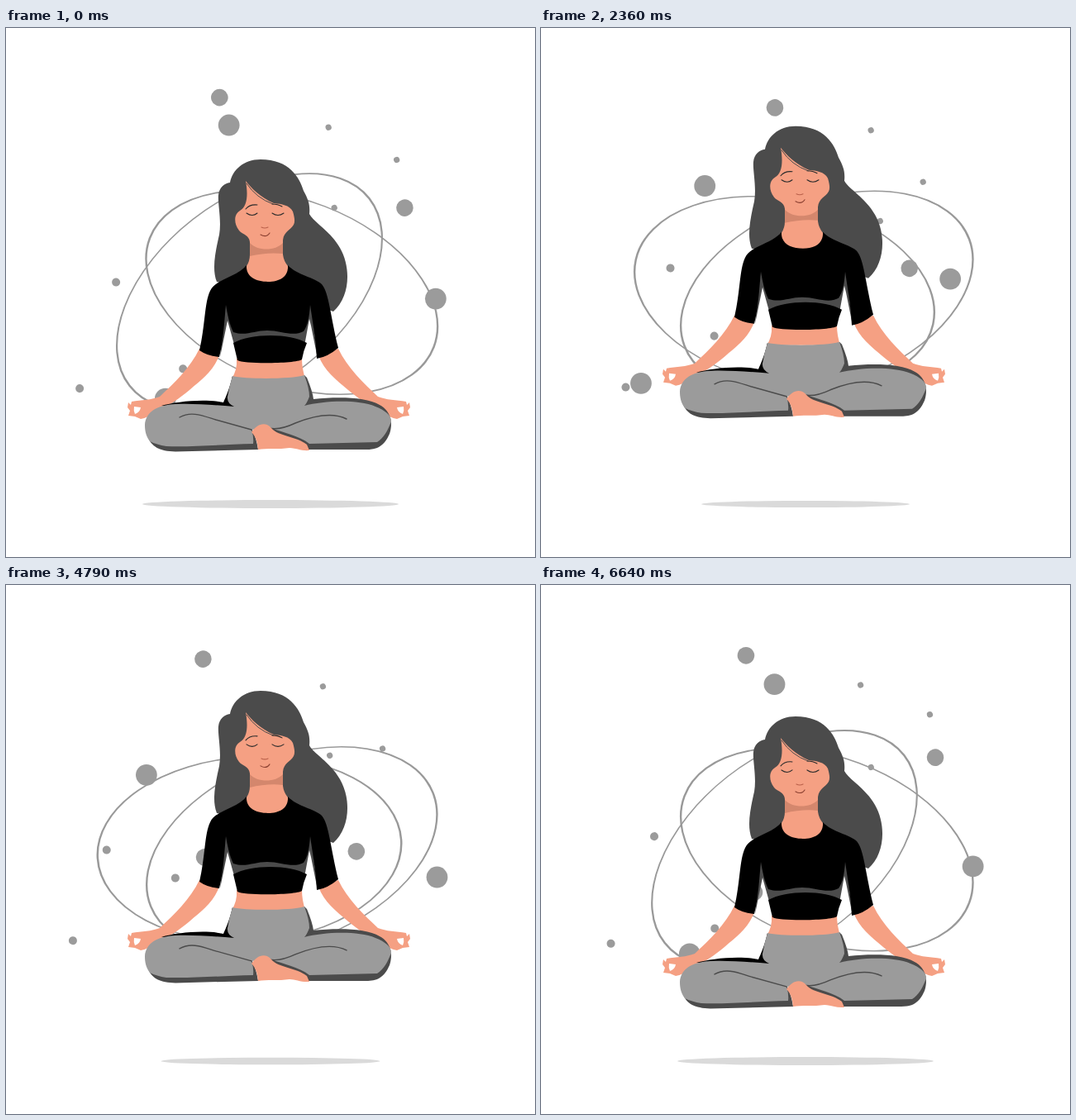
These frames come from a looping animation (640x640 px, 6.71 s). An HTML page:

```html
<!DOCTYPE html>
<html lang="en">
<head>
<meta charset="utf-8">
<title>Floating meditation</title>
<style>
  html, body { margin: 0; width: 100%; height: 100%; overflow: hidden; background: #fff; }
  svg { display: block; width: 100%; height: 100%; }
  .dark { fill: #4b4b4b; }
  .skin { fill: #f5a083; }
  .shade { fill: #d4876d; }
  .grey { fill: #9b9b9b; }
  .line { fill: none; stroke: #4b4b4b; stroke-width: 1.4; stroke-linecap: round; }
  .face { fill: none; stroke: #2b2b2b; stroke-width: 1.1; stroke-linecap: round; }
  .soft { stroke: #b9604a; }
  .ring { fill: none; stroke: #999; stroke-width: 1.5; }
</style>
</head>
<body>
<svg viewBox="0 0 640 640">
  <defs>
    <g id="dots" class="grey">
      <circle r="12.9"/><circle r="12.9"/><circle r="12.9"/>
    </g>
    <g id="arm">
      <path class="skin" d="M234 388 C223 411 203 430 186 446 C176 450 164 450 152 452 L151 456 L148 453 L147 459 L150 463 L148 469 L156 470 L163 473 C169 472 174 469 180 465 C196 458 211 447 222 438 C237 425 251 415 258 396Z"/>
      <path fill="#fff" d="M155 458 L163 459 Q162 465 156 467 Q154 463 155 458Z"/>
    </g>
  </defs>

  <ellipse id="shadow" rx="155" ry="5" fill="#dadada"/>
  <circle id="ringA" class="ring" r="111.5"/>
  <circle id="ringB" class="ring" r="111.5"/>

  <!-- one orbit, shown four times: turned, mirrored and scaled -->
  <use href="#dots"/>
  <use href="#dots" transform="matrix(-.2463 .302 -.302 -.2463 316.1 359.8)"/>
  <use href="#dots" transform="matrix(-.2623 -.7542 -.7542 .2623 641.8 390.2)"/>
  <use href="#dots" transform="matrix(-.1157 -.2548 -.2548 .1157 533.8 214.7)"/>

  <g id="body">
    <path class="dark" d="M308 159 C343 159 355 181 360 197 C366 208 368 214 367 225 C372 235 392 245 404 266 C418 290 416 326 396 343 L360 330 L255 307 C249 292 253 272 258 250 C261 232 256 213 257 202 C258 193 264 188 271 187 C274 172 287 159 308 159Z"/>

    <!-- head and neck -->
    <path class="skin" d="M290 185 C297 194 308 205 324 212 C333 213 343 214 347 222 C349 229 350 234 348 238 C344 245 336 246 335 257 V274 Q336 282 341 288 L341 312 H290 L291 288 Q295 282 295 274 V259 C294 250 286 250 282 245 C275 236 276 225 283 221 C292 216 293 202 290 185Z"/>
    <path class="shade" d="M295 260 C304 270 326 270 335 260 V273 Q316 271 295 276Z"/>
    <path class="line" d="M291 188 Q303 206 323 213" style="stroke-width: 1"/>
    <g class="face">
      <path d="M290 219 Q295 213 304 214M322 213 Q329 213 334 216"/>
      <path d="M291 224 Q298 229 304 224M322 224 Q329 229 336 224"/>
      <path class="soft" d="M309 241 Q313 243 317 241"/>
      <path d="M308 250 Q315 254 319 248" stroke="#8a3f30"/>
    </g>

    <use href="#arm"/>
    <use href="#arm" transform="matrix(-1 0 0 1 636 0)"/>

    <!-- waist and top -->
    <path class="skin" d="M279 400 H358 Q358 412 362 424 H273 Q280 414 279 400Z"/>
    <path class="dark" d="M265 332 L259 398 L268 354 L278 390 H360 L367 352 L369 360 L377 400 L369 332Z"/>
    <path d="M291 287 C290 301 302 307 317 307 C331 307 342 301 341 287 C352 299 374 302 382 310 C391 320 393 352 402 387 Q389 398 376 400 C375 378 371 356 368 335 C367 350 365 360 360 367 C347 374 333 366 316 366 C300 366 290 373 275 368 C270 357 268 347 266 335 C264 356 263 378 258 398 Q244 397 234 390 C241 361 240 332 247 318 C253 304 280 301 291 287Z"/>
    <path d="M275 381 C297 369 343 369 364 381 Q360 390 358 401 C352 406 288 407 280 402Z"/>

    <!-- legs -->
    <path d="M274 421 C270 438 266 446 263 453 C240 448 205 452 188 457 L278 460Z"/>
    <path class="dark" d="M361 420 L364 423 Q371 440 372 449 C400 446 436 446 452 456 C467 464 468 480 464 491 C457 507 448 510 436 510 H366 L340 502 L316 484 L360 457Z"/>
    <path class="dark" d="M173 498 C178 507 186 512 205 512.5 L305 510 Q303 496 297 484Z"/>
    <path class="grey" d="M274 421 C290 425 345 425 361 420 Q367 436 367 446 Q364 454 361 457 C385 451 425 449 447 458 C460 463 467 470 466 476 C462 487 457 496 449 501 L367 503 C355 493 335 490 322 484 L297 486 Q300 495 299 503 C260 504 225 507 194 506 Q182 504 174 500 C169 493 168 487 168 480 C169 465 182 456 205 455 C225 454 250 456 276 458 Q267 454 268 446 Q270 434 274 421Z"/>
    <path class="line" d="M210 471 C224 463 238 469 254 474 L297 486M412 473 C394 464 370 470 350 478 Q331 487 318 484"/>
    <path class="skin" d="M297 489 C303 480 313 475 321 484 C329 494 352 494 364 504 L367 511 C358 512 350 508 343 508 C330 510 315 508 305 510 C304 500 302 494 297 489Z"/>
  </g>
</svg>

<script>
  const LOOP = 6710, STEPS = 94, TAU = Math.PI * 2;
  const $ = id => document.getElementById(id);
  const place = (el, value) => el.setAttribute('transform', value);
  const cosAt = (p, degrees) => Math.cos(TAU * (p + degrees / 360));

  const points = [
    [266, 118], [246, 128], [169, 231], [133, 275], [80, 314], [60, 332],
    [54, 361], [67, 392], [110, 425], [183, 447], [242, 450], [310, 442],
    [380, 443], [450, 434], [509, 396], [522, 350], [520, 328], [505, 311],
    [421, 252], [400, 237], [375, 213], [299, 133], [282, 120]
  ];

  // Closed smooth curve: handles follow the neighbours, a third of each span long.
  function smoothPath(pts) {
    const n = pts.length;
    const at = i => pts[(i + n) % n];
    const handle = (i, span) => {
      const [ax, ay] = at(i - 1), [bx, by] = at(i + 1), [x, y] = at(i);
      const k = span / 3 / Math.hypot(bx - ax, by - ay);
      return [x + (bx - ax) * k, y + (by - ay) * k];
    };
    return 'M' + pts[0] + pts.map((a, i) => {
      const b = at(i + 1);
      const span = Math.hypot(b[0] - a[0], b[1] - a[1]);
      return `C${handle(i, span)} ${handle(i + 1, -span)} ${b}`;
    }).join('') + 'Z';
  }

  const orbit = document.createElementNS('http://www.w3.org/2000/svg', 'path');
  orbit.setAttribute('d', smoothPath(points));
  const orbitLength = orbit.getTotalLength();
  const dots = [...$('dots').children];
  const offsets = [0.997, 0.408, 0.731];

  function draw(p) {
    const lift = (1 - cosAt(p, 0)) / 2;
    place($('body'), `translate(0 ${-50.5 * lift})`);
    place($('shadow'), `translate(320 576) scale(${1 - 0.235 * lift})`);
    place($('ringA'), `translate(294.5 319.5) rotate(${-7.8 - 30.3 * cosAt(p, 5)}) scale(1.65 1)`);
    place($('ringB'), `translate(345.8 320) rotate(${-8.5 + 30.3 * cosAt(p, -13)}) scale(1.65 1)`);
    dots.forEach((dot, i) => {
      const { x, y } = orbit.getPointAtLength((p + offsets[i]) % 1 * orbitLength);
      place(dot, `translate(${x} ${y})`);
    });
  }

  const start = performance.now();
  function tick() {
    const ms = (performance.now() - start + 3) % LOOP;
    draw(Math.floor(ms / LOOP * STEPS) / STEPS);
    requestAnimationFrame(tick);
  }
  tick();
</script>
</body>
</html>
```
